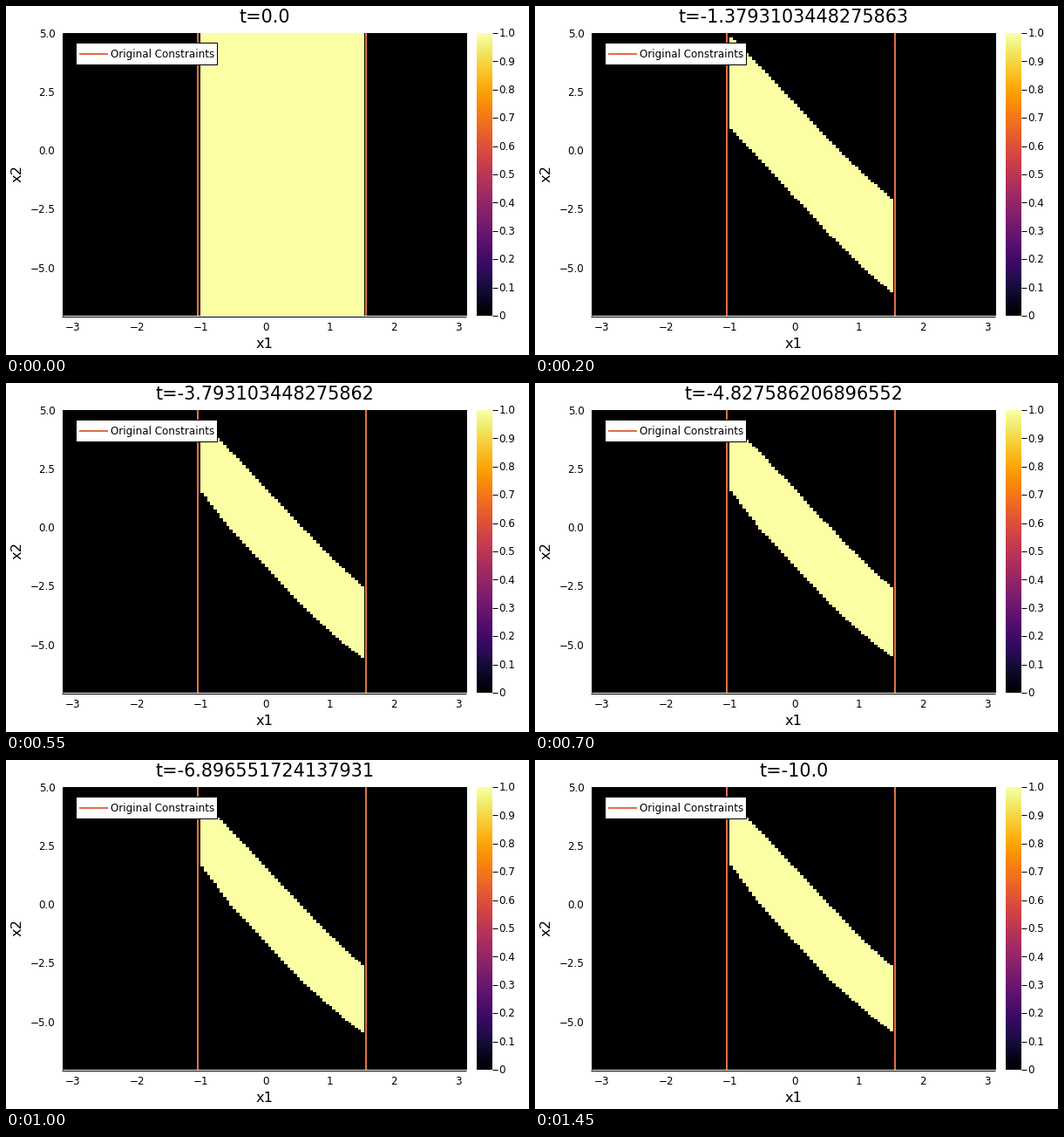
Write a matplotlib script that moves like this. It is 600 by 400 pixels and loops after 1.5 s.

```python
import numpy as np
import matplotlib.pyplot as plt
from matplotlib.animation import FuncAnimation
from matplotlib.patches import Rectangle

W, H, DPI = 600, 400, 100
FRAMES, STEP_MS = 30, 50
LEFT, RIGHT, TOP, BOTTOM = 64, 528, 31, 355
CELL = 0.05
X = -np.pi + CELL * np.arange(126)
Y = -7 + CELL * np.arange(241)
INSIDE = slice(43, 94)
WALLS = (-np.pi / 3, np.pi / 2)
RATE = 2.95     # pendulum's natural rate
BALANCE = 0.6   # angle that the full push can hold
ORANGE = "#e26f46"

plt.rcParams["font.family"] = "DejaVu Sans"


def px(x):
    return LEFT + (x - X[0] + CELL / 2) / (CELL * len(X)) * (RIGHT - LEFT)


def py(y):
    return BOTTOM - (y - Y[0] + CELL / 2) / (CELL * len(Y)) * (BOTTOM - TOP)


def pt(pixels):
    return pixels * 72 / DPI


def speed_limit(q, wall, tau):
    """Speed towards the wall that full braking can still stop within tau."""
    width = 1.52 + 0.41 * shrink(tau)
    s, c = np.sinh(RATE * tau), np.cosh(RATE * tau)
    short_run = RATE * ((wall - BALANCE) / s + (BALANCE - q) * (c / s - 1))
    return width - 2 * RATE * np.sin(q / 2) + short_run


def shrink(tau):
    return min(1, 1.38 / tau)


def safe_set(tau):
    cells = np.zeros((len(Y), len(X)))
    if tau == 0:
        cells[:, INSIDE] = 1
        return cells
    x, y = X[INSIDE], Y[:, None]
    near_left = np.maximum(-0.55 - x, 0)
    near_right = np.maximum(x - 0.55, 0)
    worn = 1 - shrink(tau)
    upper = speed_limit(x, WALLS[1], tau) - 0.16 * worn * near_right
    lower = (-speed_limit(-x, -WALLS[0], tau)
             + 0.95 * (worn + 0.2) * near_left + 0.28 * worn * near_right)
    cells[:, INSIDE] = (y <= upper) & (y >= lower)
    return cells


fig = plt.figure(figsize=(W / DPI, H / DPI), dpi=DPI, facecolor="white")
ax = fig.add_axes([0, 0, 1, 1])


def label(x, y, text, size=11.87, ha="center", **kw):
    return ax.text(x, y, text, fontsize=pt(size), ha=ha, va="baseline", **kw)


def line(xs, ys, color="black", width=1, **kw):
    ax.plot(xs, ys, color=color, lw=pt(width), solid_capstyle="butt", **kw)


def minus(text):
    return text.replace("-", "\u2212")


heat = ax.imshow(safe_set(0), cmap="inferno", vmin=0, vmax=1, origin="lower",
                 extent=(LEFT + 1, RIGHT + 0.5, BOTTOM, TOP),
                 interpolation="nearest")
ax.imshow(np.linspace(0, 1, 256)[:, None], cmap="inferno", origin="lower",
          extent=(540, 558, BOTTOM, TOP), interpolation="nearest")
ax.set(xlim=(0, W), ylim=(H, 0), aspect="auto")
ax.axis("off")

for wall in WALLS:
    line([px(wall)] * 2, [TOP, BOTTOM], ORANGE, 2)
line([LEFT, RIGHT], [BOTTOM + 0.5] * 2)
line([LEFT + 0.5] * 2, [TOP, BOTTOM])

for n in range(-3, 4):
    label(px(n) + 0.3, 371.5, minus(str(n)))
for n in np.arange(-5, 5.1, 2.5):
    label(56.5, py(n) + 4, minus(f"{n:.1f}"), ha="right")
label(296.7, 392, "x1", 16.3)
ax.text(20.5, 192.5, "x2", fontsize=pt(16.3), rotation=90, ha="right",
        va="center")

for n in range(11):
    y = BOTTOM - n / 10 * (BOTTOM - TOP)
    line([558, 564], [y, y])
    label(565.5, y + 4.3, f"{n / 10:.1f}" if n else "0", ha="left")

ax.add_patch(Rectangle((79.5, 41.5), 162, 25, fc="white", ec="black",
                       lw=pt(1), zorder=4))
line([84, 116.5], [54.5, 54.5], ORANGE, 2, zorder=5)
label(120, 59, "Original Constraints", ha="left", zorder=5)

title = label(296.8, 19, "t=0.0", 20.8)


def draw(i):
    t = -10 * i / 29
    heat.set_data(safe_set(-t))
    title.set_text(f"t={t}")
    return heat, title


anim = FuncAnimation(fig, draw, frames=FRAMES, interval=STEP_MS,
                     repeat=True, repeat_delay=0, blit=False)
plt.show()
```
